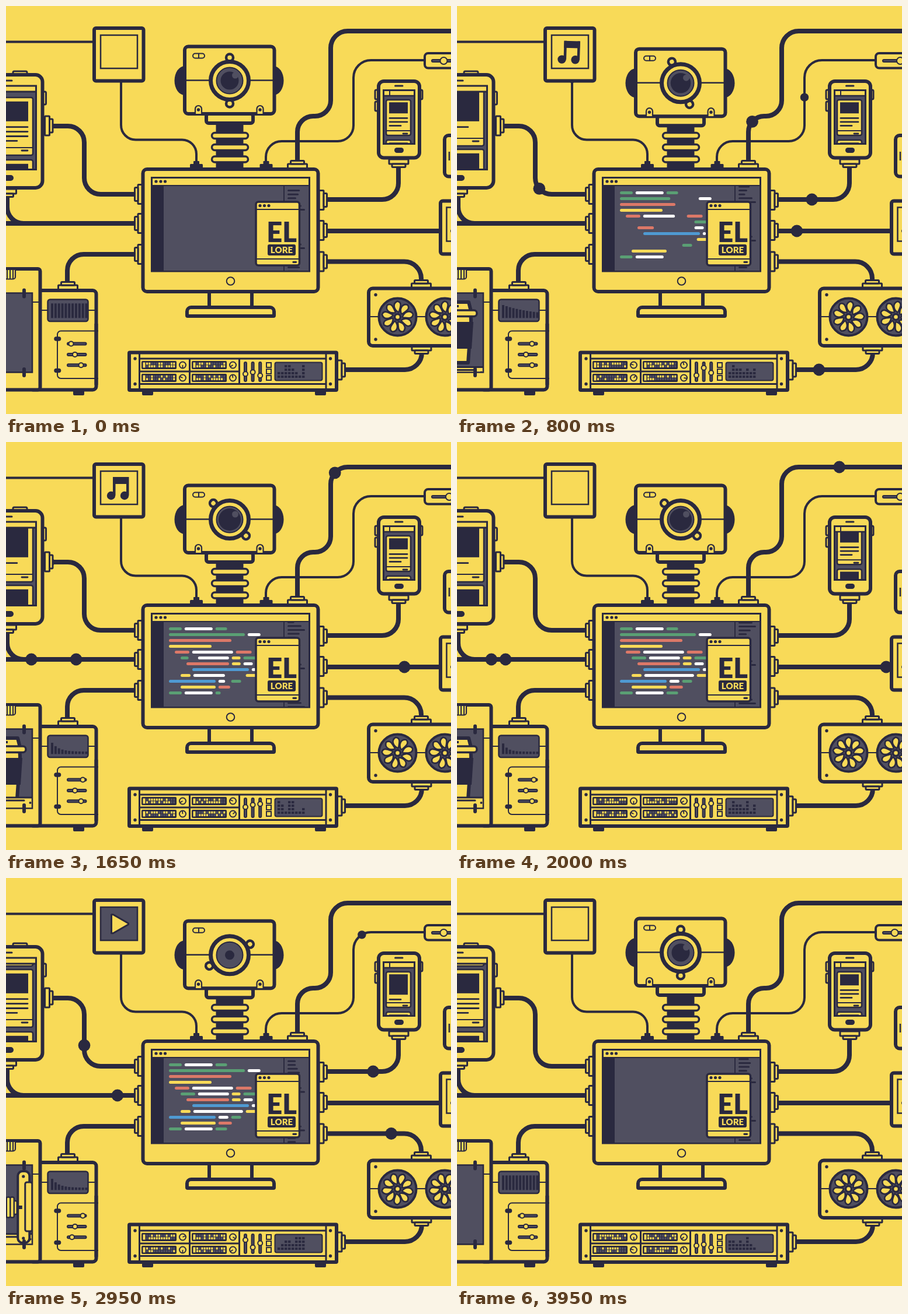
Write an HTML page with a canvas that moves like this. It is 762 by 700 pixels and loops after 4000 ms.

```html
<!DOCTYPE html>
<html lang="en">
<head>
<meta charset="utf-8">
<title>Connected workshop</title>
<style>
html, body { margin: 0; width: 100%; height: 100%; overflow: hidden; background: #f8da58; }
canvas { display: block; }
</style>
</head>
<body>
<canvas id="stage" width="762" height="700"></canvas>
<script>
const c = document.getElementById('stage').getContext('2d');
const Y = '#f8da58', D = '#2a293f', G = '#504f60';
const INK = { g: '#5a9f74', w: '#ffffff', r: '#dc7868', y: Y, b: '#4f9ad2' };
const LOOP = 4000, STEP = 50, TAU = Math.PI * 2;

/* ---- timing ---- */
const clamp = p => Math.max(0, Math.min(1, p));
const noise = n => { const v = Math.sin(n * 12.9898 + 4.1) * 43758.5453; return v - Math.floor(v); };
function ramp(t, start, time = 400) {
  const p = clamp((t - start) / time);
  return p * p * (3 - 2 * p);
}
// rises to 1 from start, falls back to 0 from end
const hold = (t, start, end, time = 400) => ramp(t, start, time) - ramp(t, end, time);

/* ---- drawing helpers ---- */
function rr(x, y, w, h, r, fill, lw) {
  c.beginPath();
  c.roundRect(x, y, w, h, r);
  if (fill) { c.fillStyle = fill; c.fill(); }
  if (lw) { c.lineWidth = lw; c.strokeStyle = D; c.stroke(); }
}
function box(x, y, w, h, fill) {
  c.fillStyle = fill;
  c.fillRect(x, y, w, h);
}
function dot(x, y, r, fill = D, lw = 0) {
  c.beginPath();
  c.arc(x, y, r, 0, TAU);
  c.fillStyle = fill; c.fill();
  if (lw) { c.lineWidth = lw; c.strokeStyle = D; c.stroke(); }
}
function line(x1, y1, x2, y2, w, cap = 'butt', color = D) {
  c.beginPath();
  c.moveTo(x1, y1); c.lineTo(x2, y2);
  c.lineWidth = w; c.strokeStyle = color; c.lineCap = cap; c.stroke();
}
function poly(pts, fill, lw) {
  c.beginPath();
  pts.forEach(([x, y]) => c.lineTo(x, y));
  c.closePath();
  c.fillStyle = fill; c.fill();
  if (lw) { c.lineJoin = 'round'; c.lineWidth = lw; c.strokeStyle = D; c.stroke(); c.lineJoin = 'miter'; }
}
function group(draw, x = 0, y = 0, turn = 0, scale = 1) {
  c.save();
  c.translate(x, y); c.rotate(turn); c.scale(scale, scale);
  draw();
  c.restore();
}
function clipTo(x, y, w, h, draw) {
  c.save();
  c.beginPath(); c.rect(x, y, w, h); c.clip();
  draw();
  c.restore();
}
function port(x, y, turn) {
  group(() => {
    rr(0, -16.5, 8, 33, 1, Y, 3);
    rr(8, -11.5, 5.5, 23, 1.5, Y, 3);
  }, x, y, turn * Math.PI / 2);
}
function slider(x1, y1, x2, y2, kx, ky, r = 4) {
  line(x1, y1, x2, y2, 6, 'round');
  line(x1, y1, x2, y2, 2, 'round', G);
  dot(kx, ky, r, Y, 2);
}

/* ---- cables, each with a pulse that travels its whole length ---- */
function cable(d, width, start, time, { power = 1, every = LOOP } = {}) {
  const el = document.createElementNS('http://www.w3.org/2000/svg', 'path');
  el.setAttribute('d', d);
  return { el, shape: new Path2D(d), size: el.getTotalLength(), width, start, time, power, every };
}
const twice = { every: LOOP / 2 }, speedUp = { power: 1.6 };
const cables = [
  cable('M0 61.5H160', 4),
  cable('M326 281V254A24.5 24.5 0 0 0 301.5 229.5H222A25 25 0 0 1 197 204V116', 4, 213, 607, twice),
  cable('M445 281V259A27 27 0 0 1 472 232H568A27 27 0 0 0 595 205V123A30 30 0 0 1 625 93H735', 4, 214, 1031, twice),
  cable('M499 279V216A27 27 0 0 1 526 189H529A27 27 0 0 0 556 162V72A29 29 0 0 1 585 43H790', 8, 0, 2446, speedUp),
  cable('M234 323H162A28 28 0 0 1 134 295V234A28 28 0 0 0 106 206H66', 8, 285, 1400, twice),
  cable('M234 373H-20', 8, 1000, 1450),
  cable('M2 306V345A28 28 0 0 0 30 373H234', 8, 800, 2530),
  cable('M234 426H133A28 28 0 0 0 105 454V486', 8, 3150, 760),
  cable('M536 332H644A28 28 0 0 0 672 304V261', 8, 285, 1400, twice),
  cable('M536 386H756', 8, 0, 2130, speedUp),
  cable('M711 484V467A29 29 0 0 0 682 438.5H536', 8, 2436, 1267),
  cable('M567 624H683A29 29 0 0 0 712 595V583', 8, 450, 1150)
];
function drawCables(t) {
  for (const k of cables) {
    c.lineCap = 'butt'; c.lineWidth = k.width; c.strokeStyle = D;
    c.stroke(k.shape);
  }
  for (const k of cables) {
    const p = (t % k.every - k.start) / k.time;
    if (!(p > 0 && p < 1)) continue;
    const at = k.el.getPointAtLength(k.size * p ** k.power);
    dot(at.x, at.y, k.width > 4 ? 10.4 : 7.2);
  }
}

/* ---- media box, top left ---- */
function musicNote() {
  [-13, 10].forEach(x => {
    dot(x, 14, 7.2);
    box(x + 3, -18, 4.5, 32, D);
  });
  box(-10, -18, 27, 12, D);
}
function mediaBox(t) {
  rr(151, 38, 84.5, 90.5, 3, Y, 6);
  clipTo(162, 50, 63, 57, () => {
    const age = Math.max(0, t - 80);
    const swing = -.35 * Math.sin(age / 65) * Math.exp(-age / 300);
    group(musicNote, 193, 78, swing, hold(t, 80, 1700, 300));
    const play = hold(t, 2150, 3550, 300);
    box(162, 107 - 57 * play, 63, 57 * play, G);
    group(() => poly([[-13, -16], [-10, -16], [16, -1], [16, 1], [-10, 16], [-13, 16]], Y, 3),
      193.5, 78.8, 0, play);
  });
  rr(162, 50, 63, 57, 0, null, 2.5);
}

/* ---- camera head ---- */
function head(t) {
  box(359.5, 196, 47, 84, D);
  [222.5, 242.5, 263].forEach(y => rr(352.5, y - 5, 62, 10, 5, Y, 3.5));
  const wide = hold(t, 550, 2100, 500), narrow = hold(t, 2100, 3080, 500);
  group(() => {
    [306, 458].forEach(x => {
      c.beginPath(); c.ellipse(x, 128, 17.5, 25, 0, 0, TAU); c.fillStyle = D; c.fill();
    });
    rr(343, 185, 80, 16, 4, Y, 6);
    rr(306, 69.5, 153.5, 115.5, 6, Y, 6);
    line(306, 127.5, 459, 127.5, 2.5);
    rr(320, 81.5, 20, 8, 4, Y, 2);
    line(330, 81, 330, 90, 2);
    [329.5, 435].forEach(x => {
      rr(x - 5.5, 171, 11, 15, [5.5, 5.5, 0, 0], Y, 2.2);
      dot(x, 178, 2.7);
    });
    group(() => [-39.5, 39.5].forEach(y => dot(0, y, 6, Y, 4.5)), 383, 128, 1.08 * narrow - .785 * wide);
    dot(383, 128, 32.5, Y, 7);
    dot(383, 128, 22.5, G, 2);
    dot(383, 128, 15.5 + 3.5 * wide - 7.5 * narrow);
    dot(392.5, 119, 5.5, G);
  }, 0, 5 * hold(t, 500, 2850));
}

/* ---- monitor ---- */
// indent, then ink and length of each word
const script = [
  '0 g22 w48 g20', '0 g130 w22', '0 r107', '0 y73', '1 r25 w70 r27', '2 g25 w53 y15 g23',
  '3 r73 y15 w16', '4 b97 w11', '2 y17 w85 y19', '0 b80 w17 g17', '2 y60 r23', '0 g22 w48 g20'
];
function codeLines(t) {
  script.forEach((text, row) => {
    const [indent, ...words] = text.split(' ');
    let x = 279 + indent * 10;
    words.forEach((word, i) => {
      const size = +word.slice(1), seed = row * 5 + i;
      const shown = clamp((t - (row && noise(seed) * 1500)) / 400);
      const gone = clamp((t - 3200 - noise(seed + 60) * 300) / 450);
      if (shown > gone) rr(x + size * gone, 318 + row * 10, size * (shown - gone), 5, 2.5, INK[word[0]]);
      x += size + 4.8;
    });
  });
}
function minimap(t) {
  line(476, 309, 476, 454, 2);
  for (let i = 0; i < 32; i++) {
    const y = 316.6 + i * 6.6 - t * .0165, k = i % 10;
    const size = k === 5 ? 27 : 7 + 14 * noise(k + 3);
    line(483.5, y, 483.5 + size, y, 3, 'round');
  }
}
function popup() {
  rr(428, 336, 74.5, 109, 4, Y, 3.5);
  line(428, 349, 502, 349, 2);
  [435, 442.5, 450].forEach(x => dot(x, 342.5, 2.6));
  line(428, 434, 502, 434, 2);
  line(492, 439.3, 496.5, 439.3, 3.2, 'round');
  rr(448, 409, 48, 19, 3, D);
  c.textAlign = 'center';
  c.fillStyle = D;
  c.font = '900 47px Lato, sans-serif';
  c.fillText('EL', 472, 404.5);
  c.fillStyle = Y;
  c.font = '900 15px Lato, sans-serif';
  c.fillText('LORE', 472, 424);
}
function monitor(t) {
  rr(348, 486, 73, 34, 0, Y, 6);
  rr(310, 517, 149, 15, [7, 7, 1, 1], Y, 6);
  [323, 373, 426].forEach(y => port(234, y, 2));
  [333, 385, 438.5].forEach(y => port(536, y, 0));
  port(499, 279, 3);
  [326, 445.5].forEach(x => {
    rr(x - 11, 271, 22, 9, 1.5, D);
    rr(x - 5, 266, 10, 8, 1, D);
  });
  rr(234.5, 280, 300, 210, 7, Y, 6);
  rr(249.5, 294.5, 270, 160.5, 0, Y, 3);
  box(251, 308, 267, 146, G);
  box(251, 308, 19, 146, D);
  line(250, 308, 519, 308, 2);
  [257, 265, 272.5].forEach(x => dot(x, 301, 2.6));
  clipTo(251, 309, 267, 145, () => {
    minimap(t);
    codeLines(t);
  });
  popup();
  dot(384.5, 472, 6.8, Y, 2);
}

/* ---- phones ---- */
function card(x, y, w, h, pad, image, lines, gap, rule) {
  rr(x, y, w, h, 3, Y, 2.5);
  const left = x + pad, right = x + w - pad, top = pad * .85;
  box(left, y + top, right - left, image, D);
  for (let i = 0; i < lines; i++) {
    const ly = y + top + image + gap * (i + 1.25);
    const short = i === lines - 1 ? pad * 2.4 : 1;
    line(left + 1, ly, right - short, ly, 2.8, 'round');
  }
  line(x, y + rule, x + w, y + rule, 2);
  line(right - pad - 3, y + rule + 5, right - 1, y + rule + 5, 2.8, 'round');
}
function smallPhone(t) {
  port(672.5, 263, 1);
  [[632, 144], [632, 164], [707, 144]].forEach(([x, y]) => rr(x, y, 6, 16, 2, Y, 3));
  rr(638, 129, 70, 131.5, 9, Y, 6);
  line(666.5, 137, 679, 137, 3, 'round');
  rr(665, 243, 16, 9, 4.5, D);
  box(646, 154, 54, 82, G);
  const shift = 69 * (ramp(t, 1895) + ramp(t, 3500));
  clipTo(647, 155, 52, 81, () => {
    for (let i = 0; i < 4; i++) {
      const tall = i % 2;
      card(651, 161 + i * 69 - shift, 42, 61, 5, tall ? 35 : 19, tall ? 1 : 3, 6.5, 53);
    }
  });
  rr(646.5, 144.5, 53, 92, 0, null, 3);
  line(646, 154, 700, 154, 2.5);
  line(657, 145, 657, 154, 2);
}
function bigPhone(t) {
  port(66.5, 205.5, 0);
  port(1, 314, 1);
  rr(12, 112, 24, 8, 2, Y, 3);
  rr(61, 147, 7.5, 22, 2, Y, 3);
  rr(-60, 118, 122.5, 194, 12, Y, 6);
  line(-5, 128, 10, 128, 3, 'round');
  rr(-20, 290, 33, 10, 5, D);
  box(-5, 147, 56, 133, G);
  const shift = 123 * ramp(t, 180) + 89 * ramp(t, 2400);
  clipTo(-5, 148, 56, 132, () => {
    for (let i = 0; i < 4; i++) {
      const tall = i % 2, y = 157 + i * 106 + tall - shift;
      card(-40, y, 86, 99, 8, tall ? 50 : 34, tall ? 1 : 4, 7.9, 86);
    }
  });
  rr(-20, 137, 71.5, 143.5, 0, null, 3);
  line(0, 147, 52, 147, 3);
}

/* ---- right edge ---- */
function edgeDevices(t) {
  rr(717, 81, 70, 25.5, 6, Y, 4);
  slider(731, 94, 775, 94, 749.5 + 9.5 * hold(t, 250, 2350), 94, 6);
  rr(751, 222, 60, 70.5, 7, Y, 6);
  line(759, 250, 759, 265, 2.5);
  rr(744, 334.5, 60, 91, 4, Y, 6);
  rr(754.5, 345.5, 50, 58, 0, Y, 2.5);
  dot(764, 386, 3);
}
function fan(x, y, turn) {
  dot(x, y, 32, G, 4);
  group(() => {
    for (let i = 0; i < 9; i++) {
      c.rotate(TAU / 9);
      c.beginPath();
      c.moveTo(8, 1);
      c.bezierCurveTo(11, -9, 21, -13, 26.5, -5);
      c.bezierCurveTo(26, 5, 15, 1, 8, 1);
      c.fillStyle = Y; c.fill();
      c.lineWidth = 2.6; c.strokeStyle = D; c.stroke();
    }
  }, x, y, turn);
  dot(x, y, 5, Y, 3.5);
}
function fans(t) {
  port(711, 484, 3);
  port(711.5, 583, 1);
  rr(621, 484.5, 200, 98.5, 7, Y, 6);
  line(621, 533, 762, 533, 2);
  [495.5, 572].forEach(y => dot(633, y, 2.7));
  [670.5, 751.5].forEach(x => fan(x, 533.5, t / 1000 * TAU));
}

/* ---- rack unit ---- */
function rackCell(x, y, n, t) {
  rr(x, y - 6, 58, 12, 1, D, 2);
  box(x + 1.5, y - 4.5, 4, 9, Y);
  for (let i = 0; i < 24; i++) {
    const lit = noise(n * 31 + i + Math.floor(t / 200) * 57) < .5;
    box(x + 7 + (i % 12) * 4.2, y - 4.3 + Math.floor(i / 12) * 4.6, 3.1, 3.7, lit ? Y : G);
  }
  const a = Math.PI / 2 + n + 2 * Math.sin(t / LOOP * TAU);
  const kx = x + 69.5;
  dot(kx, y, 5.5, Y, 2);
  line(kx, y, kx + Math.cos(a) * 5, y + Math.sin(a) * 5, 1.8);
}
function rack(t) {
  port(567, 624.5, 0);
  [233, 529].forEach(x => rr(x, 656, 19, 12, 2, D));
  rr(211, 594.5, 355, 64.5, 1, Y, 6);
  [605, 648.5].forEach(y => {
    line(228, y, 549, y, 3);
    [221, 555.5].forEach(x => dot(x, y, 2.7));
  });
  [228.5, 548].forEach(x => line(x, 594, x, 659, 3));
  [314.5, 399.5].forEach(x => line(x, 605, x, 648, 3));
  line(228, 627, 399, 627, 3);
  for (let n = 0; n < 4; n++) rackCell(233 + (n % 2) * 86, 616 + (n >> 1) * 22, n, t);
  [.64, 2.98, 1.57].forEach((phase, i) => {
    const x = 410 + i * 12.6;
    slider(x, 613, x, 642, x, 627 + 7 * Math.sin(t / LOOP * TAU + phase));
  });
  [612, 623, 634].forEach(y => rr(446, y, 8, 8, 0, Y, 2));
  rr(460.5, 611.5, 81, 31, 3, G, 2);
  for (let i = 0; i < 8; i++) {
    const size = 1 + Math.floor(4 * noise(i + Math.floor(t / 250) * 8));
    for (let k = 0; k < size; k++) box(465 + i * 6, 634 - k * 6, 4.4, 4, D);
  }
}

/* ---- tower and cabinet, bottom left ---- */
function tower(t) {
  port(106, 487, 3);
  rr(115, 656, 19, 12, 2, D);
  rr(40, 488, 114.5, 170.5, 6, Y, 6);
  line(60, 522, 155, 522, 2);
  rr(71.5, 503.5, 69, 37.5, 4, G, 2.5);
  const drain = Math.min(1, t / 2600) * (1 - ramp(t, 2750, 500));
  for (let i = 0; i < 11; i++) {
    const h = 4 + (21 - 9 * drain) * Math.exp(-1.2 * drain * drain * i);
    box(77 + i * 5.85, 535.3 - h, 4, h, D);
  }
  rr(88, 557.5, 80, 81.5, 6, null, 2);
  box(158, 552, 14, 92, Y);
  line(154.5, 545, 154.5, 650, 6);
  [571, 625.5].forEach(y => line(86, y, 90.5, y, 7.5, 'round'));
  const knobs = [
    111.5 + 20 * hold(t, 500, 3500),
    118 + 2 * hold(t, 2900, 3500),
    128.5 - 15.5 * hold(t, 2150, 3500)
  ];
  knobs.forEach((x, i) => {
    const y = 579.5 + i * 18.4;
    slider(107, y, 135.5, y, x, y);
  });
}
function workpiece() {
  poly([[-10, 508], [20, 508], [23, 520], [24, 540], [19, 612], [-10, 612]], Y, 6);
  poly([[-10, 542], [28, 542], [25, 588], [-10, 588]], D);
  line(-10, 515, 3, 515, 4);
  rr(-20, 522, 54, 10.5, 5, Y, 3.5);
}
function spindle() {
  rr(15, 554, 9, 23, 2, Y, 2.5);
  for (let x = -7; x < 17; x += 6.5) rr(x, 547.5, 6.5, 35, 2.5, Y, 2.5);
  rr(25.5, 503, 20, 123, 8, Y, 4);
  rr(38, 522, 12, 84, 3, Y, 3);
  [512, 618].forEach(y => dot(35, y, 2.6));
  line(24, 565, 33, 565, 6);
}
function cabinet(t) {
  rr(-30, 451, 88.5, 207.5, 4, Y, 6);
  rr(-10, 452, 26, 16.5, [0, 0, 4, 4], Y, 2.2);
  [2, 7, 12].forEach(x => line(x, 453, x, 468, 2));
  line(45, 508, 58, 508, 2);
  box(-5, 492, 50, 136, G);
  clipTo(-5, 493, 49, 135, () => {
    group(workpiece, -60 * ramp(t, 2150, 250), 135 * (1 - ramp(t, 150, 500)));
    const y = 629 - 19 * hold(t, 600, 2900);
    box(-5, y, 55, 20, Y);
    line(-5, y, 46, y, 3);
    line(-5, y + 5, 31, y + 5, 3, 'round');
    dot(41.5, y + 9, 2);
    group(spindle, 60 * (1 - ramp(t, 2300, 250)) - 60 * ramp(t, 2850, 550));
  });
  rr(-20, 492.5, 65, 136, 0, null, 2.5);
  [493, 628.5].forEach(y => line(31, y - 5.5, 31, y + 5.5, 6, 'round'));
}

function draw(t) {
  box(0, 0, 762, 700, Y);
  drawCables(t);
  [mediaBox, head, monitor, bigPhone, smallPhone, edgeDevices, fans, rack, tower, cabinet]
    .forEach(part => part(t));
}

const begin = performance.now();
function tick() {
  const t = (performance.now() - begin) % LOOP;
  draw(Math.floor(t / STEP) * STEP);
  requestAnimationFrame(tick);
}
tick();
</script>
</body>
</html>
```
